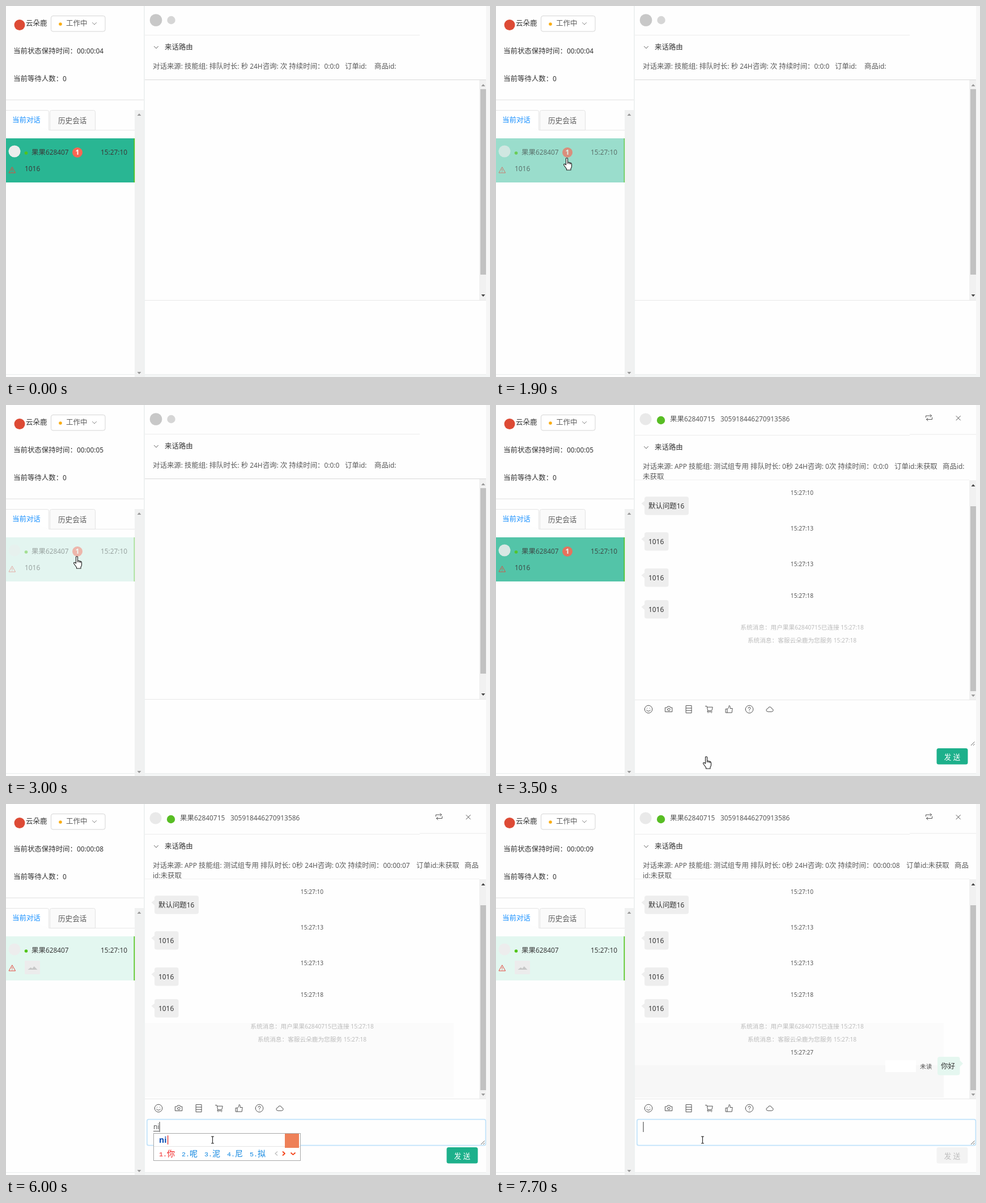
Recreate the animation shown at these times as an HTML page. Size 854 by 656 pixels, loop 8 s.

```html
<!DOCTYPE html>
<html lang="zh-CN">
<head>
<meta charset="utf-8">
<title>客服工作台</title>
<style>
html, body { margin: 0; width: 100%; height: 100%; overflow: hidden; background: #fefefe; }
svg { display: block; font-family: "Noto Sans", "Noto Sans CJK SC", "Noto Sans CJK", sans-serif; }
text { white-space: pre; }
.ime { font-family: "Liberation Mono", "Noto Sans CJK SC", "Noto Sans CJK", monospace; }
.icon { fill: none; stroke: #555; stroke-width: 1; stroke-linecap: round; stroke-linejoin: round; }
</style>
</head>
<body>
<svg id="stage" width="854" height="656" viewBox="0 0 854 656"></svg>
<script>
const LOOP = 8000, END = LOOP + 1;
const AGENT = '云朵鹿', USER = '果果628407', USER_FULL = '果果62840715';
const OPEN = 3200, SELECT = 3700, FOCUS = 4300, TYPE = 5800, COMMIT = 6900, SENT = 7300, READY = 7500;

// ---- drawing helpers ----
const WIDE = /[\u25A0-\u25FF\u2E80-\u9FFF\uFF00-\uFFEF]/;
const RUNS = /[\u25A0-\u25FF\u2E80-\u9FFF\uFF00-\uFFEF]+|[^\u25A0-\u25FF\u2E80-\u9FFF\uFF00-\uFFEF]+/g;
// Latin runs are set slightly smaller than the Chinese ones
const runs = (s, size, latin = 0.955) => s.match(RUNS).map(r => WIDE.test(r)
  ? `<tspan font-size="${size}" font-family="Noto Sans CJK SC, Noto Sans CJK, sans-serif">${r}</tspan>`
  : `<tspan font-size="${size * latin}">${r}</tspan>`).join('');

// y is the optical middle of the line
function text(x, y, s, fill = '#444', o = {}) {
  const size = o.size || 12.44;
  return `<text x="${x}" y="${y + size * 0.36}" fill="${fill}" text-anchor="${o.anchor || 'start'}"
    font-weight="${o.weight || 400}" class="${o.cls || ''}" id="${o.id || ''}">${runs(s, size, o.latin)}</text>`;
}
const rect = (x, y, w, h, fill, more = '') =>
  `<rect x="${x}" y="${y}" width="${w}" height="${h}" fill="${fill}" ${more}/>`;
const disc = (x, y, r, fill) => `<circle cx="${x}" cy="${y}" r="${r}" fill="${fill}"/>`;
const line = (x1, x2, y, color = '#e8e8e8') => rect(x1, y, x2 - x1, 1, color);
const path = (d, stroke = '#555', fill = 'none', w = 1) =>
  `<path d="${d}" stroke="${stroke}" fill="${fill}" stroke-width="${w}" stroke-linejoin="round"/>`;
const during = (a, b, body) => `<g data-from="${a}" data-to="${b}">${body}</g>`;
const arrowUp = (x, y, c) => path(`M${x - 3.5} ${y + 2}l3.5-4 3.5 4z`, 'none', c);
const arrowDown = (x, y, c) => path(`M${x - 3.5} ${y - 2}l3.5 4 3.5-4z`, 'none', c);
const chevron = (x, y, c = '#666') => path(`M${x - 3.8} ${y - 2}l3.8 4 3.8-4`, c);
const small = { size: 10.66, anchor: 'middle' };
const button = { size: 12.8, anchor: 'middle' };

function bubble(y, w, s) {
  return rect(262, y, w, 32.5, '#eeeeee', 'rx="4"') +
    path(`M263 ${y + 7}l-6.5 5 6.5 6z`, 'none', '#eeeeee') + text(269, y + 17, s, '#333');
}

// ---- left column ----
function sidebar() {
  return rect(243, 0, 2, 656, '#eef1f1') + rect(227, 184, 16, 472, '#f0f1f1') +
    arrowUp(235, 192, '#999') + arrowDown(235, 649, '#999') +
    disc(24, 33.5, 9.5, '#dd4a35') + text(35, 31, AGENT, '#333') +
    rect(79.5, 17.5, 95.5, 27.5, '#fff', 'rx="3.5" stroke="#d5d5d5"') +
    disc(96, 32, 2.8, '#faad14') + text(106, 31, '工作中', '#595959') + chevron(156, 31, '#888') +
    text(13, 80, '当前状态保持时间：00:00:04', '#333', { id: 'stateTime' }) +
    text(13, 129, '当前等待人数：0', '#333') +
    line(0, 243, 165.5, '#e2e2e2') + line(76, 227, 219) +
    path('M0 184.5H72.5q3 0 3 3V219.5', '#e3e3e3', '#fff') +
    path('M77.5 219.5V187.5q0-3 3-3H154.5q3 0 3 3V219.5z', '#e3e3e3', '#fafafa') +
    text(11, 202, '当前对话', '#1890ff') + text(92, 202, '历史会话', '#595959', { size: 12.6 });
}

function sessionItem() {
  const common = rect(225.5, 234, 1.7, 78, '#52c41a') + disc(15, 257, 10.5, '#ededed') +
    disc(35.5, 260, 2.8, '#52c41a') + text(45, 259, USER, '#3a3a3a') + text(167, 259, '15:27:10', '#3a3a3a') +
    path('M10.8 284.8L16.6 295H5z M10.8 288.2v3.3m0 1v1', '#e2483d');
  return during(0, SELECT,
      `<g id="blinkBg">${rect(0, 234, 227, 78, '#29b693')}</g><g id="blinkText">${common}` +
      disc(126, 259, 9, '#fb6653') + text(126, 259, '1', '#fff', { anchor: 'middle', weight: 700 }) +
      text(33, 288, '1016', '#3a3a3a') + '</g>') +
    during(SELECT, END, rect(0, 234, 227, 78, '#e3f7f0') + common +
      rect(33, 277, 27, 24, '#ececec', 'rx="1"') +
      path('M38.5 293l5-4 3 2 3-4 6 6z', 'none', '#c6c6c6'));
}

// ---- right column ----
function emptyPanel() {
  return disc(264.5, 25, 10.8, '#c8c8c8') + disc(291.5, 25, 7.2, '#d6d6d6') +
    line(245, 730, 51, '#ececec') + chevron(265, 73) + text(280, 73, '来话路由', '#333') +
    text(259, 107, '对话来源: 技能组: 排队时长: 秒 24H咨询: 次 持续时间：0:0:0', '#595959') +
    text(598, 107, '订单id:', '#595959') + text(650, 107, '商品id:', '#595959') +
    line(245, 847, 130, '#d9d9d9') +
    rect(835, 131, 12, 389, '#f1f1f1') + rect(837, 147, 10, 328, '#c1c1c1') +
    arrowUp(842, 140, '#999') + arrowDown(842, 512, '#444') + line(245, 847, 520);
}

function toolbar() {
  const paths = [
    // smile, camera, list, cart, thumb, question, cloud
    'M262.2 538a6.8 6.8 0 1 0 13.6 0a6.8 6.8 0 1 0-13.6 0M265.5 539.5q3.5 4 7 0M266.5 536v.2M271.5 536v.2',
    'M298.8 535h3l1-2h4l1 2h3v7.5h-12zM302.7 538.5a2.2 2.2 0 1 0 4.4 0a2.2 2.2 0 1 0-4.4 0',
    'M335.5 531.5h9.5v13h-9.5zM335.5 536h9.5M335.5 540.3h9.5',
    'M369.5 532.5h2.5l1.8 8h7l1.4-6.3h-9.6M373.8 540.5l-1 2h8.5M374 544.3h.3M380 544.3h.3',
    'M405.5 537.5h2.5v6.5h-2.5zM408 537.5l2.5-2 .8-4q2.6 0 1.7 5h4.2l-1 7.5h-8.2',
    'M440.2 538a6.8 6.8 0 1 0 13.6 0a6.8 6.8 0 1 0-13.6 0M445 536.3q0-2 2-2t2 1.9q0 1.2-2 2.3v.8M447 541.3v.2',
    'M479.7 542.3q-3-.4-2.8-2.8t2.6-2.5q.9-3.2 3.6-3.2t3.5 3.2q2.6.3 2.6 2.6t-2.6 2.7z'
  ];
  return `<g class="icon">${paths.map(d => `<path d="${d}"/>`).join('')}</g>`;
}

function chat() {
  const times = [[155, '15:27:10'], [218, '15:27:13'], [281, '15:27:13'], [337, '15:27:18']];
  const gray = '#595959';
  return disc(264, 25, 10.5, '#e9e9e9') + disc(291, 27, 7.2, '#58bd24') +
    text(307, 25, USER_FULL, gray) + text(396, 25, '305918446270913586', gray) +
    `<g class="icon"><path d="M758.5 22v-3h10m-2.5-2.5l2.5 2.5-2.5 2.5M769.5 22v3.5h-10m2.5-2.5l-2.5 2.5 2.5 2.5"/>
      <path d="M812 19.5l7.4 7.4m0-7.4l-7.4 7.4"/></g>` +
    line(245, 730, 53, '#ececec') + line(730, 847, 51.5, '#ececec') +
    chevron(265, 75) + text(280, 75, '来话路由', '#333') +
    text(259, 109, '对话来源: APP 技能组: 测试组专用 排队时长: 0秒 24H咨询: 0次 持续时间：0:0:0', gray, { id: 'routeTime' }) +
    during(OPEN, 4200, text(703, 109, '订单id:未获取', gray) + text(788, 109, '商品id:', gray) + text(259, 127, '未获取', gray)) +
    during(4200, END, text(724, 109, '订单id:未获取', gray) + text(809, 109, '商品', gray) + text(259, 127, 'id:未获取', gray)) +
    line(245, 835, 132, '#f1f1f1') +
    during(6000, END, rect(245, 387, 545, 131, '#fbfbfb')) +
    during(COMMIT, END, rect(245, 462, 545, 57, '#f7f7f7')) +
    times.map(([y, s]) => text(540, y, s, '#555', small)).join('') +
    bubble(162, 78, '默认问题16') + [225, 289, 345].map(y => bubble(y, 42.5, '1016')).join('') +
    text(540, 393, `系统消息：用户${USER_FULL}已连接 15:27:18`, '#bcbcbc', small) +
    text(540, 416, `系统消息：客服${AGENT}为您服务 15:27:18`, '#bcbcbc', small) +
    during(SENT, END, text(540, 439, '15:27:27', '#555', small) +
      rect(779, 447, 39.5, 32.5, '#e5f7f0', 'rx="4"') + path('M818 453l6 6-6 6z', 'none', '#e5f7f0') +
      text(785, 464, '你好', '#333')) +
    during(READY, END, rect(687, 453, 54, 21, '#fff') + text(748, 464, '未读', '#555', { size: 10.66 })) +
    rect(835, 133, 12, 388, '#f1f1f1') + rect(837, 179, 10, 327, '#c1c1c1') +
    arrowUp(842, 142, '#444') + arrowDown(842, 514, '#999') +
    line(245, 847, 521) + toolbar();
}

// ---- input box and candidate window ----
function imeWindow(right, typed, caretX, candidates) {
  const blue = '#0f86e0';
  return rect(260.5, 582.5, right - 260, 48, '#fff', 'stroke="#a8a8a8"') + line(261, right, 605, '#e4e4e4') +
    text(270, 594, typed, '#0b4db5', { size: 14, weight: 700, latin: 1 }) +
    rect(caretX, 586, 1.2, 16, '#e02020') +
    candidates.map(([x, s], i) =>
      text(x, 618, s, i ? blue : '#f01818', { size: 14, latin: 0.835, cls: 'ime' })).join('') +
    path(`M${right - 40} 614.5l-4 3.5 4 3.5`, '#bbb', 'none', 1.2) +
    path(`M${right - 31} 614.5l4 3.5-4 3.5`, '#f43c10', 'none', 1.7) +
    path(`M${right - 16.5} 616.5l4 3.6 4-3.6`, '#f43c10', 'none', 1.7) +
    rect(right - 27, 583, 25, 25, '#ee8058');
}

function composing(s, end) {
  return text(260, 571, s, '#555') + line(260, end, 578, '#555') + rect(end + 0.5, 562, 1, 18, '#333');
}

function inputBox() {
  const caret = rect(259.5, 562, 1, 18, '#333');
  const single = ['你', '呢', '泥', '尼', '拟'].map((c, i) => [270 + i * 40, `${i + 1}.${c}`]);
  const pairs = [[270, '1.你好'], [324, '2.你和'], [378, '3.你会'], [432, '4.(*´▽｀)ノノ'], [544, '5.NIH']];
  return during(FOCUS, TYPE,
      rect(249.5, 558.5, 596, 46, '#fefefe', 'rx="3" stroke="#c5ebe5" stroke-width="2.4"') +
      rect(249.8, 558.8, 595.6, 45.4, 'none', 'rx="2.5" stroke="#2bb0a6" stroke-width="1.2"')) +
    during(TYPE, END, rect(248.8, 557.7, 597.6, 46, '#fefefe', 'rx="3" stroke="#c0e2fa" stroke-width="1.7"')) +
    path('M838 602l6.5-6.5M842 602l2.5-2.5', '#666') +
    during(FOCUS, 4900, caret) + during(5500, TYPE, caret) +
    during(TYPE, 6000, composing('n', 267)) + during(6000, 6500, composing('ni', 270)) +
    during(6500, COMMIT, composing('nih', 276)) +
    during(COMMIT, SENT, text(260, 571, '你好', '#444') + rect(286, 562, 1, 18, '#333')) +
    during(SENT, END, caret) +
    during(OPEN, READY, rect(777.5, 607, 55, 28.5, '#1db08b', 'rx="3.5"') +
      text(805, 622, '发 送', '#fff', button)) +
    during(READY, END, rect(777.5, 607, 55, 28.5, '#f3f3f3', 'rx="3.5"') +
      text(805, 622, '发 送', '#bdbdbd', button)) +
    during(TYPE, 6000, imeWindow(519, 'n', 280, single)) +
    during(6000, 6500, imeWindow(519, 'ni', 285, single)) +
    during(6500, COMMIT, imeWindow(640, "ni'h", 295, pairs));
}

const cursors = {
  arrow: path('M1 1v14l3.3-3 2.2 5 2-1-2.1-4.7h4.5z', '#222', '#fff'),
  hand: path('M4.5 1.5q1.5-1.5 3 0v6.5l5 1.2q2 .5 2 2.5v4q0 2-1.5 3.5v2.8h-7.5v-2L1.2 14q-1.3-2 0-2.6q1.3-.5 3.3 1.6z M7.5 8v3M10 9v2.5M12.3 9.5v2.5', '#1a1a1a', '#fff', 1.1),
  beam: path('M1 .5h2l.5.5.5-.5h2M3.5 1v11M1 12.5h2l.5-.5.5.5h2', '#222', 'none', 1.1)
};

const stage = document.getElementById('stage');
stage.innerHTML = rect(0, 0, 854, 656, '#fefefe') + rect(847, 0, 7, 656, '#f6f6f6') +
  rect(245, 651, 609, 5, '#f4f6f6') + line(0, 847, 651, '#e9ecec') +
  sidebar() + sessionItem() + during(0, OPEN, emptyPanel()) + during(OPEN, END, chat() + inputBox()) +
  Object.entries(cursors).map(([k, body]) => `<g id="${k}">${body}</g>`).join('');

// ---- timeline ----
const stateTimes = [[0, 4], [2200, 5], [3700, 6], [4900, 7], [6000, 8], [7500, 9]];
const routeTimes = [[0, '0:0:0'], [4200, '00:00:06'], [5500, '00:00:07'], [COMMIT, '00:00:08']];
const fade = [[1100, 1], [1300, 0.95], [1600, 0.75], [1900, 0.47], [2300, 0.14], [2500, 0.05],
  [2800, 0.05], [3000, 0.126], [3250, 0.45], [3500, 0.8], [3700, 0.95]];
const pointer = [[0, ''], [1100, 'arrow', 507, 556], [1200, 'arrow', 250, 424], [1300, 'arrow', 202, 352],
  [1400, 'arrow', 183, 330], [1500, 'arrow', 168, 318], [1800, 'hand', 119, 268], [3000, 'hand', 119, 267],
  [3300, 'hand', 247, 321], [3400, 'hand', 352, 536], [3500, 'hand', 365, 621], [3600, 'hand', 365, 628],
  [4000, 'beam', 361, 587.5]];

const at = (table, t) => table.filter(row => row[0] <= t).pop();
function mix(table, t) {
  const i = table.findIndex(row => row[0] > t);
  if (i < 0) return table[table.length - 1][1];
  if (i === 0) return table[0][1];
  const [t0, a] = table[i - 1], [t1, b] = table[i];
  return a + (b - a) * (t - t0) / (t1 - t0);
}

const byId = id => document.getElementById(id);
const timed = [...stage.querySelectorAll('[data-from]')].map(el => [el, +el.dataset.from, +el.dataset.to]);
const setTail = (id, s) => {
  const tail = byId(id).lastElementChild;
  if (tail.textContent !== s) tail.textContent = s;
};

function render(ms) {
  const t = Math.floor(ms / 100) * 100;
  for (const [el, from, to] of timed) el.style.display = t >= from && t < to ? '' : 'none';
  const p = mix(fade, t);
  byId('blinkBg').style.opacity = p;
  byId('blinkText').style.opacity = 0.35 + 0.65 * p;
  setTail('stateTime', '00:00:0' + at(stateTimes, t)[1]);
  setTail('routeTime', at(routeTimes, t)[1]);
  const [, kind, x, y] = at(pointer, t);
  for (const k in cursors) byId(k).style.display = k === kind ? '' : 'none';
  if (kind) byId(kind).setAttribute('transform', `translate(${x} ${y})`);
}

const start = performance.now();
function tick() {
  render((performance.now() - start) % LOOP);
  requestAnimationFrame(tick);
}
tick();
</script>
</body>
</html>
```
